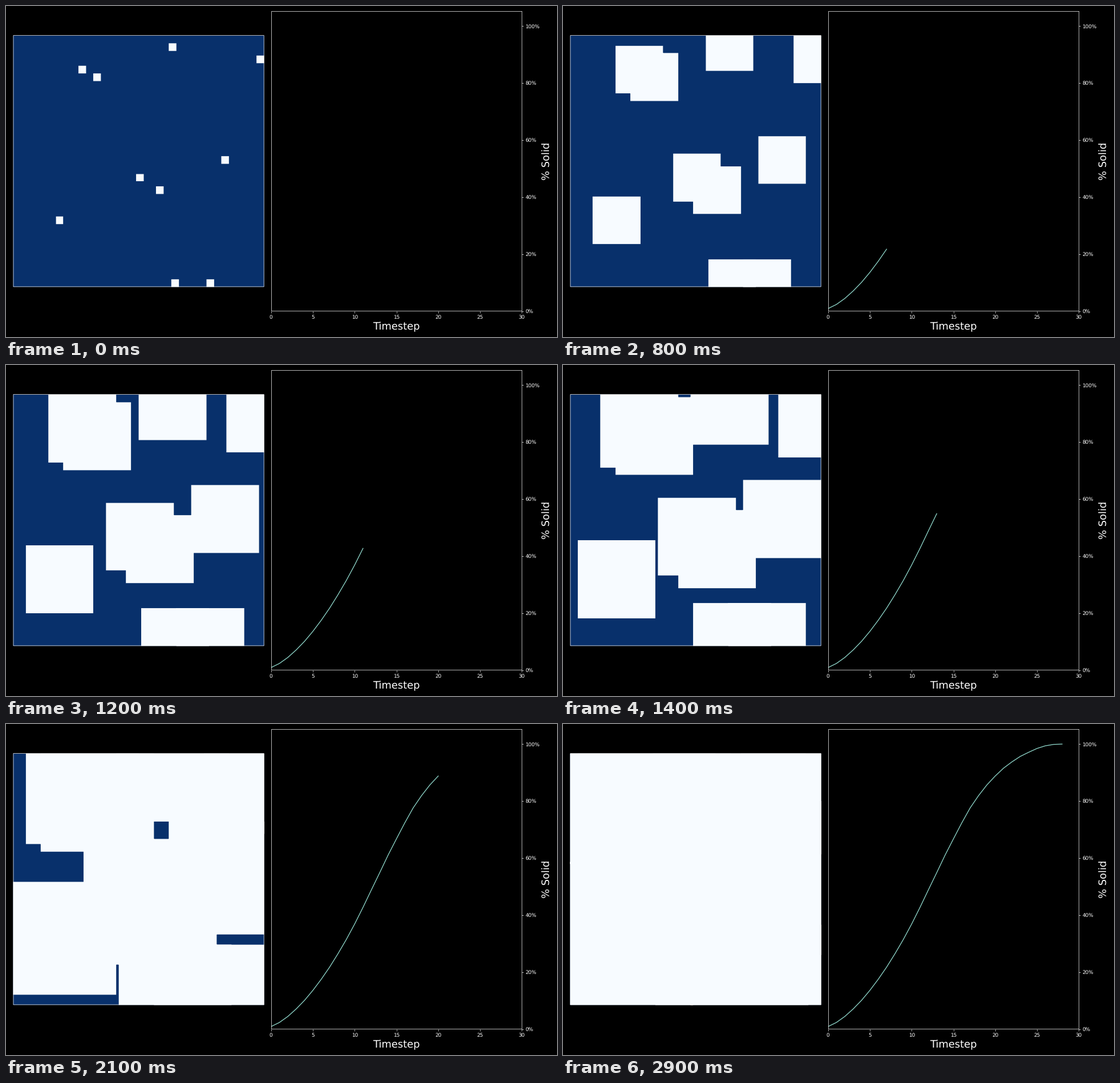
A matplotlib script that plays this animation: 966 px wide and 580 px high, repeating every 3 s.

```python
import numpy as np
import matplotlib.pyplot as plt
from matplotlib.animation import FuncAnimation
from matplotlib.patches import PathPatch, Rectangle
from matplotlib.path import Path
from matplotlib.ticker import PercentFormatter

W, H, DPI = 966, 580, 64
N = 100          # cells per side
PITCH = 4.92     # raster steps per cell; cell edges round to whole steps
STEPS = 30
LIQUID, SOLID = "#08306b", "#f7fbff"

# Nucleation sites as (column, row)
SEEDS = [(63, 4), (98, 9), (27, 13), (33, 16), (84, 49),
         (50, 56), (58, 61), (18, 73), (64, 98), (78, 98)]

plt.style.use("dark_background")
plt.rcParams.update({"font.family": "DejaVu Sans", "font.size": 10.06,
                     "text.hinting": "no_hinting"})
fig = plt.figure(figsize=(W / DPI, H / DPI), dpi=DPI)


def add_axes(left, top, right, bottom):
    """Place axes by pixel edges measured from the top left corner."""
    return fig.add_axes([left / W, 1 - bottom / H,
                         (right - left) / W, (bottom - top) / H])


def add_frame(left, top, right, bottom):
    """Draw a thin white outline centred on the given pixel edges."""
    fig.add_artist(Rectangle((left, H - bottom), right - left, bottom - top,
                             fill=False, ec="white", lw=0.8, snap=False,
                             transform=None, zorder=5))


def grain_path(col, row, radius):
    """Square grain around a cell, cut off at the border of the grid."""
    low = np.array([col, row]) - radius
    high = np.array([col, row]) + radius + 1
    edges = np.clip([low, high], 0, N)
    (x0, y0), (x1, y1) = np.round(edges * PITCH) / PITCH
    return Path([(x0, y0), (x1, y0), (x1, y1), (x0, y1), (x0, y0)],
                closed=True)


def solid_path(radius):
    return Path.make_compound_path(
        *(grain_path(c, r, radius) for c, r in SEEDS))


# Growing solid
grid = add_axes(12.52, 51.9, 452.56, 492.3)
grid.set(xlim=(0, N), ylim=(N, 0))
grid.axis("off")
grid.add_patch(Rectangle((0, 0), N, N, fc=LIQUID, lw=0,
                         snap=False, clip_on=False))
solid = grid.add_patch(PathPatch(solid_path(1), fc=SOLID, lw=0,
                                 snap=False, clip_on=False))
add_frame(12.97, 51.46, 452.15, 491.9)

# Solid fraction over time
chart = add_axes(464.7, 10.02, 904.3, 534.7)
chart.set(xlim=(0, STEPS), ylim=(0, 1.05),
          xticks=range(0, STEPS + 1, 5), yticks=np.arange(6) / 5)
chart.yaxis.tick_right()
chart.yaxis.set_label_position("right")
chart.yaxis.set_major_formatter(PercentFormatter(1, decimals=0))
chart.set_xlabel("Timestep", fontsize=20.12)
chart.set_ylabel("% Solid", fontsize=20.12)
chart.spines[:].set_visible(False)
curve, = chart.plot([], [], color="#8dd3c7", lw=1.5)
add_frame(465.53, 9.4, 904.7, 534.7)

# Each cell turns solid once a square grain of radius step + 1 reaches it
rows, cols = np.mgrid[:N, :N]
reach = np.min([np.maximum(abs(cols - c), abs(rows - r)) for c, r in SEEDS],
               axis=0)
fraction = [np.mean(reach <= t + 1) for t in range(STEPS)]


def update(step):
    solid.set_path(solid_path(step + 1))
    curve.set_data(range(step), fraction[:step])
    return solid, curve


anim = FuncAnimation(fig, update, frames=STEPS, interval=100,
                     repeat=True, repeat_delay=0)
plt.show()
```
